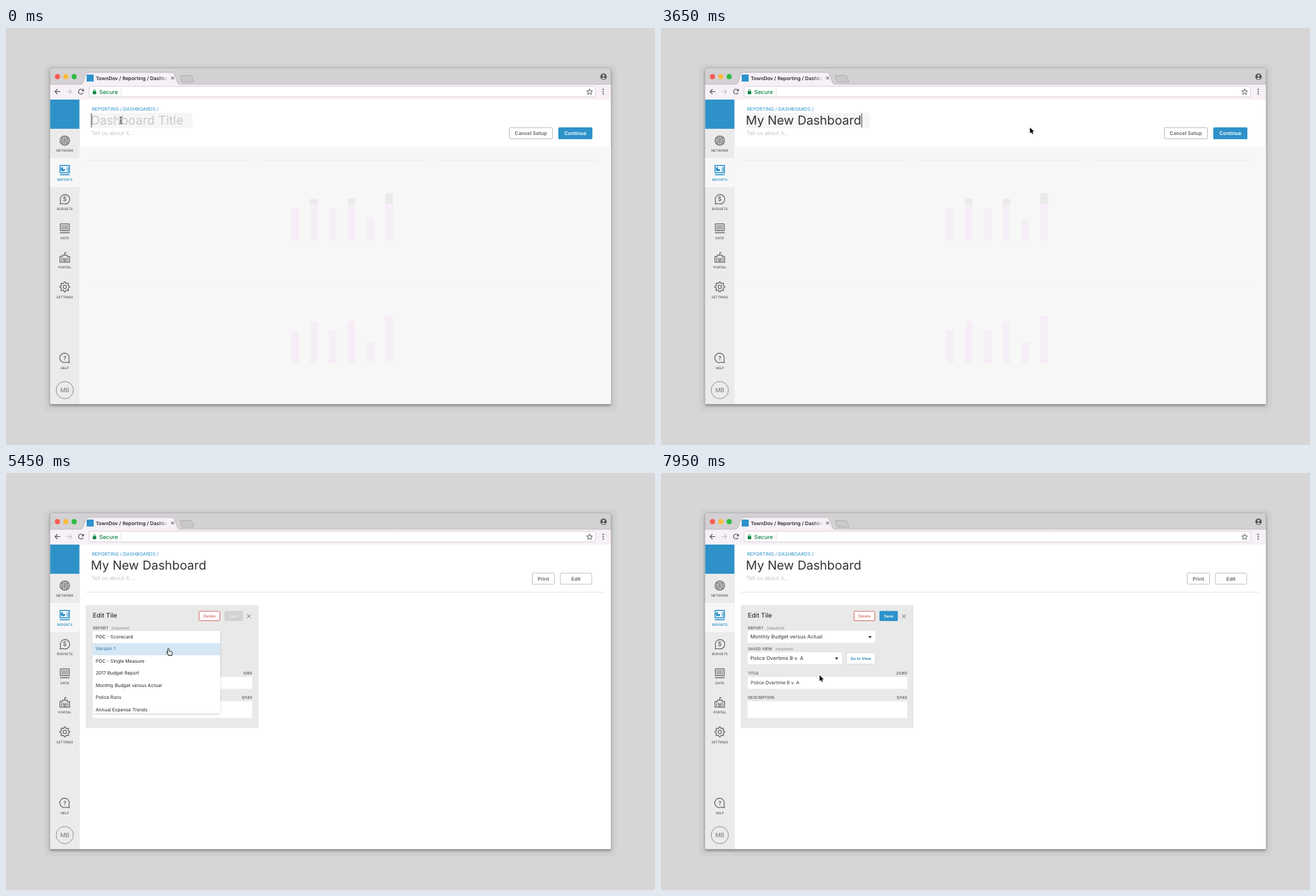
Animation, 933 px wide and 600 px high, one loop 8 s. Source, as an HTML page with a canvas:

```html
<!DOCTYPE html>
<html lang="en">
<head>
<meta charset="utf-8">
<title>Dashboard setup</title>
<style>
html, body { margin: 0; width: 100%; height: 100%; overflow: hidden; background: #d6d6d6; }
canvas { display: block; }
</style>
</head>
<body>
<canvas id="stage" width="933" height="600"></canvas>
<script>
const ctx = document.getElementById('stage').getContext('2d');
ctx.textRendering = 'geometricPrecision';
const LOOP = 8000, STEP = 50;
const BLUE = '#2e92c9', INK = '#333', ICON = '#666', CHROME = '#f7f0f6';

const TITLE = 'My New Dashboard', TITLE_SIZE = 17.8;
const KEY_TIMES = [150, 400, 500, 700, 950, 1200, 1450, 1800, 2000, 2150, 2200, 2350, 2550, 2650, 2900, 3100];
const REPORTS = ['POC - Scorecard', 'Version 1', 'POC - Single Measure', '2017 Budget Report',
  'Monthly Budget versus Actual', 'Police Runs', 'Annual Expense Trends'];
const VIEWS = ['Tax Revenue YoY', 'Department B v. A', 'Police B v. A', 'Police Overtime B v. A', 'Police Supplies B v. A'];
const ROW = 17.45;

// Pointer stops: time, x, y
const POINTER = [
  [0, 165, 133], [3250, 165, 133], [4000, 829.5, 151.5], [4250, 829.5, 151.5], [4950, 233.5, 238],
  [5300, 233.5, 238], [5450, 233.5, 252.5], [6150, 213, 299.5], [6250, 213, 299.5], [6750, 190, 266],
  [7100, 190, 266], [7200, 186, 289.5], [7550, 185.5, 318], [7850, 185.5, 318], [7950, 228, 291], [8000, 228, 291]
];

const HAND = new Path2D('M-1 .9Q-1-.2 0-.2T1 .9V3.8l3.4.8q1.3.3 1.2 1.7L4.9 10H0L-2.4 6.2q-.6-1.2.6-1.2l.8.9z');
const ARROW = new Path2D('M0 0V8.4l1.9-1.8 1.3 3 1.4-.6-1.3-2.9H6z');
const IBEAM = new Path2D('M-2-5Q0-5 0-4Q0-5 2-5M0-4V4M-2 5Q0 5 0 4Q0 5 2 5M-1 1H1');

const clamp = v => Math.max(0, Math.min(1, v));
const inside = (p, x, y, w, h) => p.x >= x && p.x <= x + w && p.y >= y && p.y <= y + h;

function setFont(size, weight = 400) {
  ctx.font = `${weight} ${size}px Inter, sans-serif`;
}

function text(str, x, y, size, color, weight = 400, align = 'left') {
  setFont(size, weight);
  ctx.textAlign = align;
  ctx.fillStyle = color;
  ctx.fillText(str, x, y);
  return ctx.measureText(str).width;
}

function box(x, y, w, h, fill, border, r = 0, line = 1) {
  ctx.beginPath();
  if (border) ctx.roundRect(x + line / 2, y + line / 2, w - line, h - line, r);
  else ctx.roundRect(x, y, w, h, r);
  if (fill) { ctx.fillStyle = fill; ctx.fill(); }
  if (border) { ctx.strokeStyle = border; ctx.lineWidth = line; ctx.stroke(); }
}

function stroke(path, color, width = 1, x = 0, y = 0) {
  ctx.save();
  ctx.translate(x, y);
  ctx.strokeStyle = color;
  ctx.lineWidth = width;
  ctx.stroke(typeof path === 'string' ? new Path2D(path) : path);
  ctx.restore();
}

function disc(x, y, r, fill, border, width = 1) {
  ctx.beginPath();
  ctx.arc(x, y, r, 0, 2 * Math.PI);
  if (fill) { ctx.fillStyle = fill; ctx.fill(); }
  if (border) { ctx.strokeStyle = border; ctx.lineWidth = width; ctx.stroke(); }
}

function fillPath(d, color, x = 0, y = 0) {
  ctx.save();
  ctx.translate(x, y);
  ctx.fillStyle = color;
  ctx.fill(new Path2D(d));
  ctx.restore();
}

function button(label, x, y, w, h, size, color, fill, border, weight = 600) {
  box(x, y, w, h, fill, border, 1.5);
  text(label, x + w / 2, y + h / 2 + size * 0.36, size, color, weight, 'center');
}

function browser() {
  box(0, 0, 933, 600, '#d6d6d6');
  box(55, 52, 823, 500, '#d0d0d0', null, 8);
  ctx.save();
  ctx.shadowColor = 'rgba(0,0,0,.45)';
  ctx.shadowBlur = 4;
  ctx.shadowOffsetY = 1;
  box(63.5, 58, 806, 484, '#d3d1d3', null, [4, 4, 1, 1]);
  ctx.restore();

  ['#fb5a54', '#fbbb3c', '#2bbd42'].forEach((c, i) => disc(74 + 12 * i, 70, 3.7, c));
  box(63.5, 81, 806, 22, CHROME);
  fillPath('M107 81.3Q109.500 81 110.500 78.500L115 66.500Q116 64 118 64H239Q241 64 242 66.500L246.500 78.500Q247.500 81 250 81.300Z', CHROME);
  stroke('M63.500 81H107Q109.500 81 110.500 78.500L115 66.500Q116 64 118 64H239Q241 64 242 66.500L246.500 78.500Q247.500 81 250 81H869.500', '#b5b1b5', 0.7);
  const spare = 'M251 68.500H265.500Q267 68.500 267.500 70L270 76.500Q270.300 78 269 78H255Q253.500 78 253 76.500L250.500 70Q250 68.500 251 68.500Z';
  fillPath(spare, '#cac8ca');
  stroke(spare, '#aaa7aa', 0.8);

  box(116, 67, 10, 10, BLUE);
  ctx.save();
  ctx.beginPath();
  ctx.rect(128, 64, 105, 16);
  ctx.clip();
  text('TownDov / Reporting / Dashboards', 129, 74.6, 7.15, '#111', 500);
  const fade = ctx.createLinearGradient(219, 0, 233, 0);
  fade.addColorStop(0, 'rgba(247,240,246,0)');
  fade.addColorStop(1, CHROME);
  box(219, 65, 15, 14, fade);
  ctx.restore();
  stroke('M-2-2L2 2M2-2L-2 2', '#444', 1, 239.5, 72);
  disc(859, 70, 4.6, '#555');
  disc(859, 68.6, 1.4, CHROME);
  fillPath('M-2.700 2.500Q0 .3 2.700 2.500Q0 4.500-2.700 2.500Z', CHROME, 859, 70);

  stroke('M4 0H-3.500M0-3.500L-3.500 0L0 3.500', '#555', 1.1, 74, 91.5);
  stroke('M-4 0H3.500M0-3.500L3.500 0L0 3.500', '#ccc6cc', 1.1, 91, 91.5);
  stroke('M3 1.500A3.500 3.500 0 1 1 2.500-2.300', '#555', 1.1, 108, 91.5);
  fillPath('M4-4V-.5H.5Z', '#555', 108, 91.5);
  box(119, 83.5, 729, 16, '#fff', '#d8d2d8', 2);
  box(124.7, 91, 5, 4.2, '#0b8043', null, 0.5);
  stroke('M-1.500 0V-1Q-1.500-2.500 0-2.500T1.500-1V0', '#0b8043', 0.9, 127.2, 91.2);
  text('Secure', 134, 94.6, 8, '#0b8043', 500);
  box(165, 86, 0.8, 11, '#e0dce0');
  ctx.beginPath();
  for (let i = 0; i < 10; i++) {
    const a = -Math.PI / 2 + i * Math.PI / 5, r = i % 2 ? 1.9 : 4.4;
    ctx.lineTo(839 + r * Math.cos(a), 92 + r * Math.sin(a));
  }
  ctx.closePath();
  ctx.strokeStyle = '#555';
  ctx.lineWidth = 0.9;
  ctx.stroke();
  [88.2, 91.5, 94.8].forEach(y => disc(858.5, y, 1, '#555'));
}

const icons = {
  NETWORK(x, y) {
    disc(x, y, 6.8, '#c6c6c6', ICON, 1.1);
    stroke('M-6-3H6M-6.500 0H6.500M-6 3H6M0-6.500V6.500M-4.500-5L4.500 5M4.500-5L-4.500 5M-2-6.500Q-6 0-2 6.500M2-6.500Q6 0 2 6.500', '#777', 0.6, x, y);
  },
  REPORTS(x, y) {
    box(x - 7.5, y - 7, 15, 12, '#fff', BLUE, 0.5, 1.5);
    fillPath('M-1.500-1H1.700A3.200 3.200 0 1 1-1.500-4.200Z', BLUE, x - 1, y);
    stroke('M3.300-4V2.500M5-4V2.500', BLUE, 0.9, x, y);
    stroke('M-7 7H7', BLUE, 1.5, x, y);
  },
  BUDGETS(x, y) {
    stroke('M-6.500 7L-6 2.500A6.800 6.800 0 1 1-2.500 6.300Z', ICON, 1.2, x, y);
    text('$', x, y + 3.2, 9, ICON, 500, 'center');
  },
  DATA(x, y) {
    box(x - 7, y - 7, 14, 11, null, ICON, 0.5, 1.2);
    stroke('M-5-3.700H5M-5-1.500H5M-5 .7H5M-3.500-4.500V2M-1.200-4.500V2M1.200-4.500V2M3.500-4.500V2', '#777', 0.7, x, y);
    stroke('M-7 6.300H7', ICON, 1.3, x, y);
  },
  PORTAL(x, y) {
    stroke('M-7 6.500V-1.500H-3.500V-3.500H3.500V-1.500H7V6.500ZM-4.500 0V5M-1.800 0V5M1.800 0V5M4.500 0V5M0 1V6M0-3.500V-7H2.500', ICON, 1.1, x, y);
  },
  SETTINGS(x, y) {
    ctx.beginPath();
    for (let i = 0; i < 32; i++) {
      const a = (i - 0.5) * Math.PI / 16, r = i % 4 < 2 ? 7.1 : 5.4;
      ctx.lineTo(x + r * Math.cos(a), y + r * Math.sin(a));
    }
    ctx.closePath();
    ctx.strokeStyle = ICON;
    ctx.lineWidth = 1.2;
    ctx.stroke();
    disc(x, y, 2.4, null, ICON, 1.1);
  },
  HELP(x, y) {
    stroke('M6.500 7L6 2.500A6.800 6.800 0 1 0 2.500 6.300Z', ICON, 1.2, x, y);
    text('?', x, y + 3.1, 8.5, ICON, 600, 'center');
  }
};

function sidebar() {
  const x = 84.5;
  box(63.5, 103, 42, 439, '#ebebeb');
  box(63.5, 103, 42, 42, BLUE);
  box(63.5, 187, 42, 42, '#f7f7f7');
  Object.keys(icons).forEach((name, i) => {
    const y = name === 'HELP' ? 474.5 : 162 + 42.1 * i;
    icons[name](x, y);
    text(name, x, y + 16, 4.75, name === 'REPORTS' ? BLUE : ICON, 600, 'center');
  });
  disc(x, 521, 12.4, null, '#8a8a8a', 0.9);
  text('MB', x, 524.1, 8.5, '#777', 400, 'center');
}

function placeholderCharts() {
  box(105.5, 171, 764, 371, '#f7f7f7');
  [116, 366, 616].forEach(x => {
    box(x, 189.5, 237, 1, '#e9e9e9');
    box(x, 365, 237, 1, '#f2f2f2');
  });
  const heights = [47, 60, 47, 60, 30, 68];
  heights.forEach((h, i) => {
    const x = 410 + 27.05 * i;
    box(x, 306 - Math.min(h, 53), 11, Math.min(h, 53), '#f6eef6');
    if (h > 53) box(x, 306 - h, 11, h - 53, '#eaeaea');
    box(x, 482 - h, 11, h, '#f6eef6');
  });
}

function header(t, p) {
  const editing = t < 4150;
  text('REPORTING / DASHBOARDS /', 123.5, 118.7, 6.8, BLUE);
  text('Tell us about it...', 122.5, 154.1, 7.9, '#c4c4c4');
  const typed = TITLE.slice(0, KEY_TIMES.filter(k => k <= t).length);
  if (editing) {
    setFont(TITLE_SIZE);
    box(122, 122, Math.max(146, ctx.measureText(typed).width + 12), 22, '#f6f6f6');
  }
  const width = text(typed, 122, 138.6, TITLE_SIZE, INK);
  if (!typed) text('Dashboard Title', 122, 138.6, TITLE_SIZE, '#c9c9c9');
  if (editing) {
    box(122.3 + width, 123, 1, 20, '#444');
    const hover = inside(p, 794, 143, 49, 17) && t >= 3300;
    button('Cancel Setup', 723, 143, 63, 17, 7.2, ICON, '#fff', '#c2c2c2');
    button('Continue', 794, 143, 49, 17, 7.2, '#fff', hover ? '#2782b5' : BLUE);
  } else {
    const hover = inside(p, 797, 144, 46, 17);
    box(115, 171, 745, 1, '#e6e6e6');
    button('Print', 756, 143.5, 33, 17, 7.2, ICON, '#fff', '#c2c2c2');
    button('Edit', 796.5, 143.5, 46, 17, 7.2, hover ? BLUE : ICON, '#fff', hover ? BLUE : '#c2c2c2');
  }
}

function fieldLabel(label, y, required) {
  const w = text(label, 125, y, 5.65, '#555', 500);
  if (required) text('(required)', 125 + w + 4.5, y, 5.55, '#888');
}

function select(y, w, value) {
  box(124.5, y, w, 17, '#fff');
  text(value, 128.5, y + 10.7, 7.3, INK);
  fillPath('M-2.500-1.200H2.500L0 1.800Z', '#222', 124.5 + w - 7.5, y + 8.7);
}

function list(items, y, w, h, p) {
  ctx.save();
  ctx.shadowColor = 'rgba(0,0,0,.28)';
  ctx.shadowBlur = 3;
  ctx.shadowOffsetY = 0.5;
  box(124.5, y, w, h, '#fff');
  ctx.restore();
  items.forEach((item, i) => {
    const top = y + i * ROW;
    const active = p.y >= top && p.y < top + ROW;
    if (active) box(124.5, top, w, ROW, '#d5e7f5');
    text(item, 129, top + 10.6, 6.7, active ? '#1f6f9c' : '#222');
  });
}

function tile(t, p) {
  const reportChosen = t >= 6300, viewChosen = t >= 7700;
  ctx.globalAlpha = clamp((t - 4250) / 250);
  box(114.5, 190, 248.5, 177, '#e9e9e9');
  text('Edit Tile', 124.7, 208.4, 9.15, INK, 500);
  button('Delete', 277, 198.5, 31, 14.5, 5.85, '#d4504a', '#fff', '#d9736e', 400);
  button('Save', 314, 198.5, 26.5, 14.5, 5.7, viewChosen ? '#fff' : '#ececec', viewChosen ? BLUE : '#d2d2d2');
  stroke('M-2.700-2.700L2.700 2.700M2.700-2.700L-2.700 2.700', ICON, 0.9, 349.2, 206);

  fieldLabel('REPORT', 224.6, true);
  select(227.3, 183.5, reportChosen ? REPORTS[4] : '');
  fieldLabel('SAVED VIEW', 255.2, true);
  select(258, 135.5, viewChosen ? VIEWS[3] : '');
  button('Go to View', 266, 258, 42.5, 17.5, 5.65, viewChosen ? '#2382b8' : '#7db9dc', '#fff', '#d6d6d6');
  fieldLabel('TITLE', 289.6);
  text(viewChosen ? '23/60' : '0/60', 353.6, 289.6, 5.5, INK, 400, 'right');
  box(124.5, 293.5, 229.5, 17, '#fff');
  if (viewChosen) text(VIEWS[3], 129, 304, 6.7, INK);
  fieldLabel('DESCRIPTION', 324.6);
  text('0/140', 353.6, 324.6, 5.5, INK, 400, 'right');
  box(124.5, 328.5, 229.5, 24, '#fff');

  if (t >= 5050 && !reportChosen) {
    ctx.globalAlpha = t < 5100 ? 0.5 : 1;
    list(REPORTS, 227.3, 183.5, 118.7, p);
  }
  ctx.globalAlpha = 1;
  if (t >= 6900 && !viewChosen) list(VIEWS, 258, 135.5, 91, p);
}

function pointerAt(t) {
  const i = POINTER.findIndex(k => k[0] > t);
  const [t0, x0, y0] = POINTER[i - 1], [t1, x1, y1] = POINTER[i];
  const u = (t - t0) / (t1 - t0), e = u * u * (3 - 2 * u);
  return { x: x0 + (x1 - x0) * e, y: y0 + (y1 - y0) * e };
}

function pointer(t, p) {
  if (t >= 150 && t < 3300) return;
  const listOpen = (t >= 5050 && t < 6300) || (t >= 6900 && t < 7700);
  const overControl = inside(p, 794, 143, 49, 18) ||
    (t >= 4500 && (inside(p, 124, 227, 184, 17) || inside(p, 124, 258, 136, 17)));
  const overInput = t < 4150 ? inside(p, 122, 122, 167, 22) : t >= 4500 && inside(p, 124, 294, 230, 16);
  ctx.save();
  ctx.translate(p.x, p.y);
  ctx.lineJoin = 'round';
  if (listOpen || overControl) {
    ctx.fillStyle = '#fff';
    ctx.fill(HAND);
    stroke(HAND, '#222', 1);
    stroke('M1 7V8.700M2.500 7V8.700M-.5 7V8.700', '#444', 0.5);
  } else if (overInput) {
    stroke(IBEAM, '#222', 0.9);
  } else {
    stroke(ARROW, '#fff', 1.4);
    ctx.fillStyle = '#000';
    ctx.fill(ARROW);
  }
  ctx.restore();
}

function draw(t) {
  const p = pointerAt(t);
  browser();
  box(105.5, 103, 764, 439, '#fff');
  sidebar();
  if (t < 4150) placeholderCharts();
  header(t, p);
  if (t > 4250) tile(t, p);
  pointer(t, p);
  box(63.5, 541.3, 806, 0.9, '#8c8c8c');
}

const start = performance.now();
function frame() {
  const elapsed = (performance.now() - start) % LOOP;
  draw(Math.floor(elapsed / STEP) * STEP);
  requestAnimationFrame(frame);
}
frame();
</script>
</body>
</html>
```
